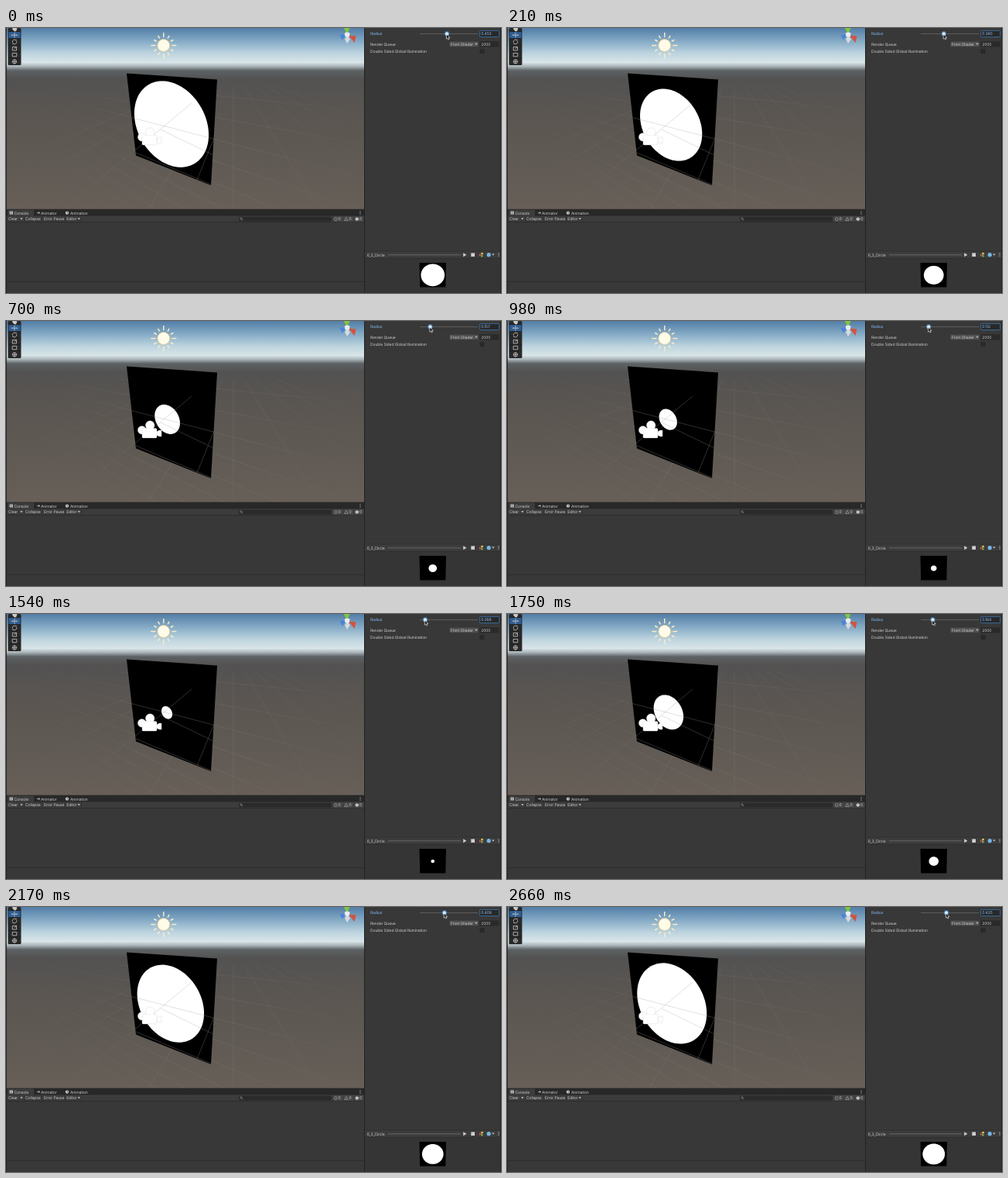
These frames come from a looping animation (640 px wide and 342 px high, 2800 ms). An HTML page:

```html
<!DOCTYPE html>
<html lang="en">
<head>
<meta charset="utf-8">
<title>Circle shader radius</title>
<style>
html, body { margin: 0; width: 100%; height: 100%; overflow: hidden; background: #383838; }
svg { display: block; width: 100vw; height: 100vh; }
text { font: 5.1px Inter, Roboto, sans-serif; letter-spacing: -.03em; fill: #c8c8c8; text-rendering: geometricPrecision; }
</style>
</head>
<body>
<svg viewBox="0 0 640 342" preserveAspectRatio="none">
  <defs>
    <linearGradient id="sky" x1="0" y1="0" x2="0" y2="234" gradientUnits="userSpaceOnUse">
      <stop offset="0" stop-color="#527da6"/>
      <stop offset=".07" stop-color="#83a9c5"/>
      <stop offset=".14" stop-color="#bdd4df"/>
      <stop offset=".19" stop-color="#d9e5e8"/>
      <stop offset=".212" stop-color="#a9b4b8"/>
      <stop offset=".235" stop-color="#5d6264"/>
      <stop offset=".28" stop-color="#535252"/>
      <stop offset=".5" stop-color="#5b5651"/>
      <stop offset="1" stop-color="#675f58"/>
    </linearGradient>
    <radialGradient id="fade" cx="250" cy="150" r="230" gradientUnits="userSpaceOnUse">
      <stop offset="0" stop-color="#bbb" stop-opacity=".2"/>
      <stop offset="1" stop-color="#bbb" stop-opacity="0"/>
    </radialGradient>
    <clipPath id="ground"><rect x="1" y="75" width="462" height="159"/></clipPath>
    <clipPath id="inQuad"><path d="M156 58.5 273 66.5 265 203 168 164.5Z"/></clipPath>
  </defs>

  <!-- scene view -->
  <rect width="463" height="234" fill="url(#sky)"/>
  <g id="grid" clip-path="url(#ground)" stroke="url(#fade)" stroke-width=".6"></g>
  <path d="M156 58.5 273 66.5 265 203 168 164.5Z"/>
  <path id="disc" fill="#fff"/>
  <g clip-path="url(#inQuad)" stroke="#999" stroke-opacity=".55" stroke-width=".55" fill="none">
    <path d="M160 115 270 143.5M168 161 265 202M240 97 166 158.5M269 142 247 196M200 131 268 164" />
  </g>

  <g id="sun" stroke="#f7ecc9" stroke-width="1.5" stroke-linecap="round">
    <circle cx="203.8" cy="22.5" r="8" fill="#fffbe9" stroke="#dccb98" stroke-width="1"/>
  </g>

  <g fill="#fff" stroke="#cfcfcf" stroke-width=".4">
    <circle cx="175.7" cy="140.8" r="5.3"/>
    <circle cx="186.2" cy="134.6" r="5.8"/>
    <path d="M195 142.7 198 141H201V149H198L195 147.4Z"/>
    <rect x="176" y="138.5" width="19" height="12.4" rx="1.5"/>
    <path d="M176.5 139.5H191" stroke="#fff" stroke-width="2"/>
  </g>

  <!-- tools -->
  <rect x="2.5" width="17" height="48" rx="1.5" fill="#292929"/>
  <rect x="3.5" y="5" width="15" height="8.2" fill="#305f93"/>
  <path d="M3 4.6H19M3 13.5H19M3 22H19M3 30.4H19M3 38.8H19" stroke="#1d1d1d" stroke-width=".6"/>
  <g fill="none" stroke="#c9c9c9" stroke-width=".8">
    <path d="M8.8 0V2L11 4H12.5L13.7 2V0Z" fill="#c9c9c9"/>
    <path d="M7.5 9.2H14.5M11 5.8V12.6M8.4 8.2 7.4 9.2 8.4 10.2M13.6 8.2 14.6 9.2 13.6 10.2"/>
    <path d="M8.4 18.5A2.7 2.7 0 0 1 13.2 16.2V14.8M13.6 17.2A2.7 2.7 0 0 1 8.8 19.6V21"/>
    <path d="M8.3 24.3H13.5V29H8.3ZM10.5 26.8 13.5 24.3"/>
    <path d="M8.2 32.4H13.8V36.8H8.2Z"/>
    <circle cx="11" cy="43.4" r="2.6"/><path d="M8 43.4H14M11 40.4V46.4"/>
  </g>

  <!-- orientation gizmo -->
  <path d="M436.7 0H444.5L441 8Z" fill="#83c63b"/>
  <path d="M431.5 9 440 8.5 434.8 15.5Z" fill="#4a83dc"/>
  <path d="M443 9.5 452.5 10.5 450.5 19Z" fill="#d5523f"/>
  <path d="M438 14.5 441.2 9 445 14.5 441 20Z" fill="#d5dadd"/>
  <path d="M437.8 6.5 441 5.2 444.5 6.6 444 10.8 441 12 438.2 10.5Z" fill="#e8ecee"/>
  <text x="435" y="31.6" fill-opacity=".28">Persp</text>

  <!-- console -->
  <rect y="234" width="463" height="108" fill="#383838"/>
  <rect y="233.7" width="463" height="9" fill="#282828"/>
  <rect x="2" y="234.6" width="34" height="8.2" fill="#3c3c3c"/>
  <rect y="242.6" width="463" height="7.8" fill="#3c3c3c"/>
  <path d="M0 250.5H463M0 327.3H463" stroke="#272727" stroke-width=".7"/>
  <path d="M23.5 243V250M47 243V250M76.5 243V250M97.5 243V250" stroke="#2c2c2c" stroke-width=".5"/>
  <rect x="4.6" y="236.6" width="4.4" height="4" rx=".6" fill="#c4c4c4"/>
  <path d="M5.4 237.7H8.2M5.4 239.2H8.2" stroke="#444" stroke-width=".5"/>
  <path d="M40 238.6H43.5M42.2 237.2 43.7 238.6 42.2 240" stroke="#c4c4c4" stroke-width=".8" fill="none"/>
  <circle cx="79" cy="238.6" r="2.2" fill="#c4c4c4"/>
  <path d="M79 237.2V238.7H80.2" stroke="#333" stroke-width=".5" fill="none"/>
  <rect x="301" y="243.7" width="120" height="5.7" rx="1.5" fill="#2a2a2a"/>
  <circle cx="304" cy="246" r="1.2" fill="none" stroke="#aaa" stroke-width=".5"/>
  <path d="M304.9 247 306.2 248.3" stroke="#aaa" stroke-width=".6"/>
  <rect x="423" y="243" width="39" height="7.2" fill="#474747"/>
  <circle cx="426.3" cy="246.6" r="1.9" fill="none" stroke="#aaa" stroke-width=".6"/>
  <path d="M440 244.4 442.3 248.4H437.7Z" fill="none" stroke="#aaa" stroke-width=".6"/>
  <circle cx="453.8" cy="246.6" r="2.1" fill="#ddd"/>
  <path d="M453.8 245.4V247M453.8 247.5V248" stroke="#444" stroke-width=".6"/>
  <path d="M436 243V250M449.5 243V250" stroke="#2c2c2c" stroke-width=".5"/>

  <!-- inspector -->
  <rect x="463" width="177" height="342" fill="#383838"/>
  <path d="M463.5 0V342M.4 0V342M639.6 0V342" stroke="#222"/>
  <path d="M535 7.5H610" stroke="#606060" stroke-width=".9"/>
  <rect x="612.6" y="3.4" width="25" height="8.2" rx="1" fill="#282828" stroke="#3a78b4" stroke-width=".8"/>
  <rect x="573" y="17.2" width="38" height="7.2" rx="1" fill="#515151" stroke="#2d2d2d" stroke-width=".4"/>
  <rect x="612.6" y="17.2" width="25" height="7.2" rx="1" fill="#2a2a2a"/>
  <rect x="612.8" y="27.4" width="5.4" height="5.4" rx=".8" fill="#2a2a2a" stroke="#212121" stroke-width=".4"/>

  <!-- preview -->
  <rect x="464" y="288" width="175" height="9.4" fill="#3c3c3c"/>
  <rect x="464" y="297.4" width="175" height="44.6" fill="#353535"/>
  <path d="M464 288H639M464 297.4H639" stroke="#292929" stroke-width=".6"/>
  <path d="M494 292.8H588" stroke="#646464"/>
  <path d="M591.2 290.2 595.4 292.7 591.2 295.2Z" fill="#d0d0d0"/>
  <rect x="601.3" y="290.4" width="4.7" height="4.6" fill="#d0d0d0"/>
  <path d="M612 291.5 614.5 293 612 294.8Z" fill="#d65c4e"/>
  <circle cx="615.5" cy="291.2" r="1.4" fill="#e0c24e"/>
  <circle cx="615.3" cy="294.2" r="1.2" fill="#81b34e"/>
  <circle cx="624.2" cy="292.7" r="2.6" fill="#76b5e3"/>
  <path d="M534.5 303H569L568.3 334.6H535.2Z"/>
  <path id="mini" fill="#fff"/>

  <g id="labels"></g>
  <g id="arrows" fill="#c4c4c4"></g>
  <g id="dots" fill="#c4c4c4"></g>
  <text x="614.3" y="9.3" id="value" style="fill:#8fbdf0"></text>

  <g id="handle">
    <circle cy="7.4" r="3.3" fill="#3d7fc0" fill-opacity=".75"/>
    <circle cy="7.4" r="2.2" fill="#d9e9f5"/>
    <path d="M-.6 8V14.1L.8 12.9 1.8 15 2.9 14.5 2 12.5H3.8Z" fill="#111" stroke="#fff" stroke-width=".6"/>
  </g>
</svg>
<script>
const $ = id => document.getElementById(id);

function add(parent, tag, attrs, label) {
  const el = document.createElementNS('http://www.w3.org/2000/svg', tag);
  for (const k in attrs) el.setAttribute(k, attrs[k]);
  if (label) el.textContent = label;
  $(parent).appendChild(el);
  return el;
}

[
  ['Console', 10.5, 240.5], ['Animator', 45, 240.5], ['Animation', 83, 240.5],
  ['Clear', 3, 248.3], ['Collapse', 25, 248.3], ['Error Pause', 49, 248.3], ['Editor', 78.3, 248.3],
  ['0', 429.6, 248.3], ['0', 443.6, 248.3], ['0', 457, 248.3],
  ['Render Queue', 471, 22.7], ['From Shader', 575, 22.6], ['2000', 614.3, 22.6],
  ['Double Sided Global Illumination', 471, 31.8], ['6_3_Circle', 466.8, 294.7]
].forEach(([s, x, y]) => add('labels', 'text', { x, y }, s));
add('labels', 'text', { x: 471, y: 9.3, style: 'fill:#7fb5ee' }, 'Radius');
$('labels').lastChild.previousSibling.setAttribute('font-weight', '600');

[[20, 246.3], [94.3, 246.3], [608, 20.7], [629.8, 292.6]].forEach(([x, y]) =>
  add('arrows', 'path', { d: `M${x - 1.7} ${y - 1}h3.4l-1.7 2.2Z` }));
[[458, 238.5], [637, 292.6]].forEach(([cx, y]) =>
  [-1.7, 0, 1.7].forEach(d => add('dots', 'circle', { cx, cy: y + d, r: .55 })));

// eight rays, alternately long and short
for (let i = 0; i < 12; i++) {
  const a = i * Math.PI / 6, c = Math.cos(a), s = Math.sin(a), end = i % 3 ? 14 : 16;
  add('sun', 'path', { d: `M${203.8 + 11 * c} ${22.5 + 11 * s}L${203.8 + end * c} ${22.5 + end * s}` });
}

// floor lines running from two vanishing points
for (let i = 0; i < 9; i++) {
  add('grid', 'path', { d: `M-82 52L518 ${52 + 600 * (.1 + i * .08)}` });
  add('grid', 'path', { d: `M294 52L${294 + (i - 4) * 110} 234` });
}

// maps the unit square onto four corners in perspective
function project([x0, y0, x1, y1, x2, y2, x3, y3]) {
  const ax = x1 - x2, ay = y1 - y2, bx = x3 - x2, by = y3 - y2;
  const sx = x0 - x1 + x2 - x3, sy = y0 - y1 + y2 - y3;
  const det = ax * by - bx * ay;
  const g = (sx * by - bx * sy) / det, h = (ax * sy - sx * ay) / det;
  return (u, v) => {
    const w = g * u + h * v + 1;
    return [
      ((x1 - x0 + g * x1) * u + (x3 - x0 + h * x3) * v + x0) / w,
      ((y1 - y0 + g * y1) * u + (y3 - y0 + h * y3) * v + y0) / w
    ];
  };
}

const onQuad = project([156, 58.5, 273, 66.5, 265, 203, 168, 164.5]);
const onMini = project([534.5, 303, 569, 303, 568.3, 334.6, 535.2, 334.6]);

function circle(map, r) {
  const pts = [];
  for (let i = 0; i < 96; i++) {
    const a = i * Math.PI / 48;
    pts.push(map(.5 + r * Math.cos(a), .5 + r * Math.sin(a)).map(n => n.toFixed(2)).join(' '));
  }
  return 'M' + pts.join('L') + 'Z';
}

const STEP = 70, LOOP = 2800;
// [step, radius]
const keys = [
  [0, .453], [2, .412], [4, .349], [6, .274], [8, .207], [10, .157], [12, .129], [14, .112],
  [16, .079], [17, .066], [21, .066], [22, .068], [24, .133], [26, .236], [28, .336],
  [30, .393], [32, .425], [40, .425]
];

function radiusAt(n) {
  const i = keys.findIndex(k => k[0] > n);
  const [a, ra] = keys[i - 1], [b, rb] = keys[i];
  return ra + (rb - ra) * (n - a) / (b - a);
}

let last = -1;
function draw(ms) {
  const n = Math.floor((ms % LOOP) / STEP);
  if (n === last) return;
  last = n;
  const r = radiusAt(n);
  $('disc').setAttribute('d', circle(onQuad, r));
  $('mini').setAttribute('d', circle(onMini, r));
  $('value').textContent = r.toFixed(3);
  $('handle').setAttribute('transform', `translate(${(537 + 73 * r).toFixed(2)} 0)`);
}

let start;
function tick(now) {
  if (start === undefined) start = now;
  draw(now - start);
  requestAnimationFrame(tick);
}
draw(0);
requestAnimationFrame(tick);
</script>
</body>
</html>
```
